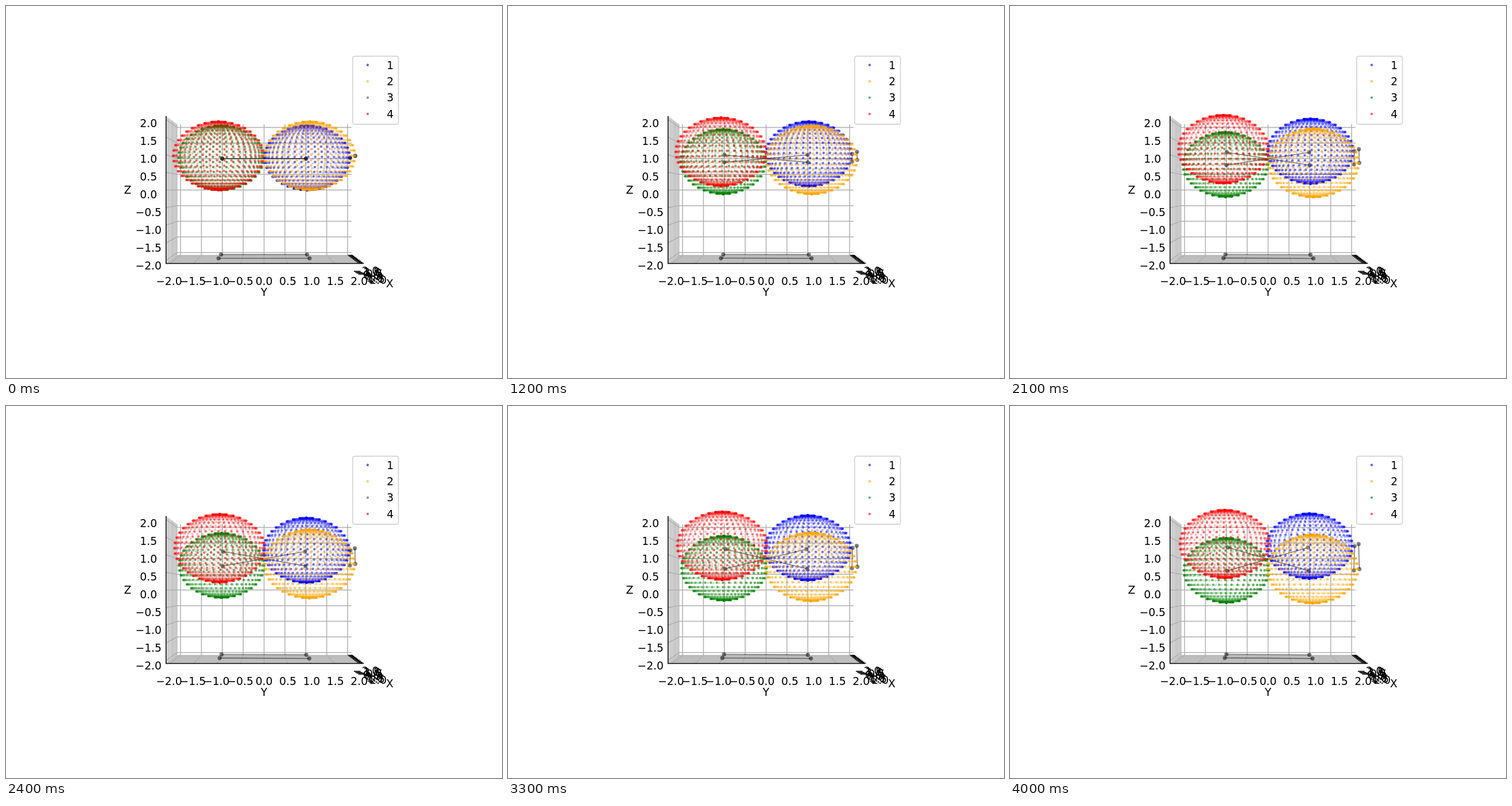
An HTML page with a canvas for the animation above (4.1 s loop, 864x648 px).

```html
<!DOCTYPE html>
<html lang="en">
<head>
<meta charset="utf-8">
<title>Four spheres</title>
<style>
  html, body { margin: 0; width: 100%; height: 100%; overflow: hidden; background: #fff; }
  svg, canvas { position: absolute; left: 0; top: 0; width: 864px; height: 648px; display: block; }
  text { font: 18.75px "DejaVu Sans", sans-serif; text-anchor: middle; fill: #000; }
</style>
</head>
<body>
<svg id="axes" viewBox="0 0 864 648"></svg>
<canvas id="plot" width="864" height="648"></canvas>
<script>
const STEP = 100, STEPS = 41;
const COLORS = ["#0000ff", "#ffa500", "#008000", "#ff0000"];
const ALPHA = 0.6;
const DOT = 2.2;
const LIM = 2 + 1 / 12;
const TICKS = Array.from({ length: 9 }, (_, i) => i / 2 - 2);

// Perspective camera on the +x axis, looking at the origin
const SIZE = 498.96, FOCAL = SIZE / 0.185;
const CX = 449.54, CY = 320.5;
const UNIT = 0.28575, UNIT_Z = UNIT * 0.75;
function project(x, y, z) {
  const k = FOCAL / (10 - x * UNIT);
  return [CX + k * y * UNIT, CY - k * z * UNIT_Z];
}

// Static axes, labels and legend
const svg = document.getElementById("axes");
function add(tag, attrs, text) {
  const el = document.createElementNS("http://www.w3.org/2000/svg", tag);
  for (const key in attrs) el.setAttribute(key, attrs[key]);
  if (text !== undefined) el.textContent = text;
  svg.appendChild(el);
}
function line(color, ...points) {
  const d = points.map(p => project(...p).map(v => v.toFixed(2)).join(" ")).join("L");
  add("path", { d: "M" + d, fill: "none", stroke: color, "stroke-width": 1.5, "stroke-linecap": "square" });
}
// Centres a label vertically on its digits
function label(text, x, y) {
  add("text", { x: x.toFixed(2), y: (y + 6.8).toFixed(2) }, text);
}
function tickLabel(v, point) {
  const [x, y] = project(...point);
  label(v.toFixed(1).replace("-", "\u2212"), x, y + 7.6);
}

function drawAxes() {
  const grid = "#b0b0b0", out = LIM + 0.347;
  for (const v of TICKS) line(grid, [v, -LIM, LIM], [v, -LIM, -LIM], [v, LIM, -LIM]);
  for (const v of TICKS) line(grid, [-LIM, v, LIM], [-LIM, v, -LIM], [LIM, v, -LIM]);
  for (const v of TICKS) line(grid, [LIM, -LIM, v], [-LIM, -LIM, v], [-LIM, LIM, v]);

  line("#000", [-LIM, LIM, -LIM], [LIM, LIM, -LIM]);
  line("#000", [LIM, -LIM, -LIM], [LIM, LIM, -LIM]);
  line("#000", [LIM, -LIM, -LIM], [LIM, -LIM, LIM]);

  for (const v of TICKS) {
    line("#000", [v, LIM - 0.069, -LIM], [v, LIM + 0.035, -LIM]);
    tickLabel(v, [v, out, -out]);
    tickLabel(v, [out, v, -out]);
    tickLabel(v, [out, -out, v]);
  }
  label("X", 668.5, 483.5);
  label("Y", 449.5, 498);
  label("Z", 212, 320);
}

function drawLegend() {
  add("rect", { x: 603.8, y: 87.5, width: 79.8, height: 118.5, rx: 3.75,
    fill: "#fff", stroke: "#ccc", "stroke-width": 1.875, "stroke-opacity": 0.8 });
  COLORS.forEach((fill, i) => {
    const y = 102.8 + i * 28.4;
    add("circle", { cx: 630, cy: y, r: DOT, fill, "fill-opacity": ALPHA });
    label(i + 1, 669.3, y);
  });
}

// Unit sphere as parallels and meridians, far points first
const ball = [];
for (let i = 0; i <= 20; i++) {
  for (let j = 0; j < 40; j++) {
    const lat = i * Math.PI / 20, lon = j * Math.PI / 20;
    ball.push([Math.sin(lat) * Math.cos(lon), Math.sin(lat) * Math.sin(lon), Math.cos(lat)]);
  }
}
ball.sort((a, b) => a[0] - b[0]);

const ctx = document.getElementById("plot").getContext("2d");

function disc(x, y, r) {
  ctx.beginPath();
  ctx.arc(x, y, r, 0, 2 * Math.PI);
  ctx.fill();
}

function centers(a) {
  const s = Math.sin(a);
  const ux = 1 - 0.5 * a, uy = 1 - 0.05 * a - 0.16 * a * a, uz = 1 + s - 0.225 * a * a;
  const dx = 1 + 0.25 * a, dy = 1 - 0.17 * a * a, dz = 1 - s;
  return [[-ux, uy, uz], [dx, dy, dz], [-dx, -dy, dz], [ux, -uy, uz]];
}

function bar(p, q) {
  const [x1, y1] = project(...p), [x2, y2] = project(...q);
  ctx.beginPath();
  ctx.moveTo(x1, y1);
  ctx.lineTo(x2, y2);
  ctx.stroke();
  disc(x1, y1, 3.6);
  disc(x2, y2, 3.6);
}

function sphere([cx, cy, cz], color) {
  ctx.fillStyle = color;
  for (const [x, y, z] of ball) {
    ctx.globalAlpha = ALPHA * (0.65 + 0.35 * x);
    disc(...project(cx + x, cy + y, cz + z), DOT);
  }
}

function draw(step) {
  const c = centers(step * 0.01);
  ctx.clearRect(0, 0, 864, 648);

  // Each linked pair is projected onto three planes
  ctx.globalAlpha = 0.5;
  ctx.fillStyle = ctx.strokeStyle = "#000";
  ctx.lineWidth = 1.6;
  for (const [i, j] of [[0, 2], [1, 3]]) {
    for (const flat of [p => [-2, p[1], p[2]], p => [p[0], 2, p[2]], p => [p[0], p[1], -2]]) {
      bar(flat(c[i]), flat(c[j]));
    }
  }
  for (const i of [2, 0, 3, 1]) sphere(c[i], COLORS[i]);
}

let shown = -1;
function tick() {
  const step = Math.floor(performance.now() / STEP) % STEPS;
  if (step !== shown) draw(shown = step);
  requestAnimationFrame(tick);
}

drawAxes();
drawLegend();
tick();
</script>
</body>
</html>
```
